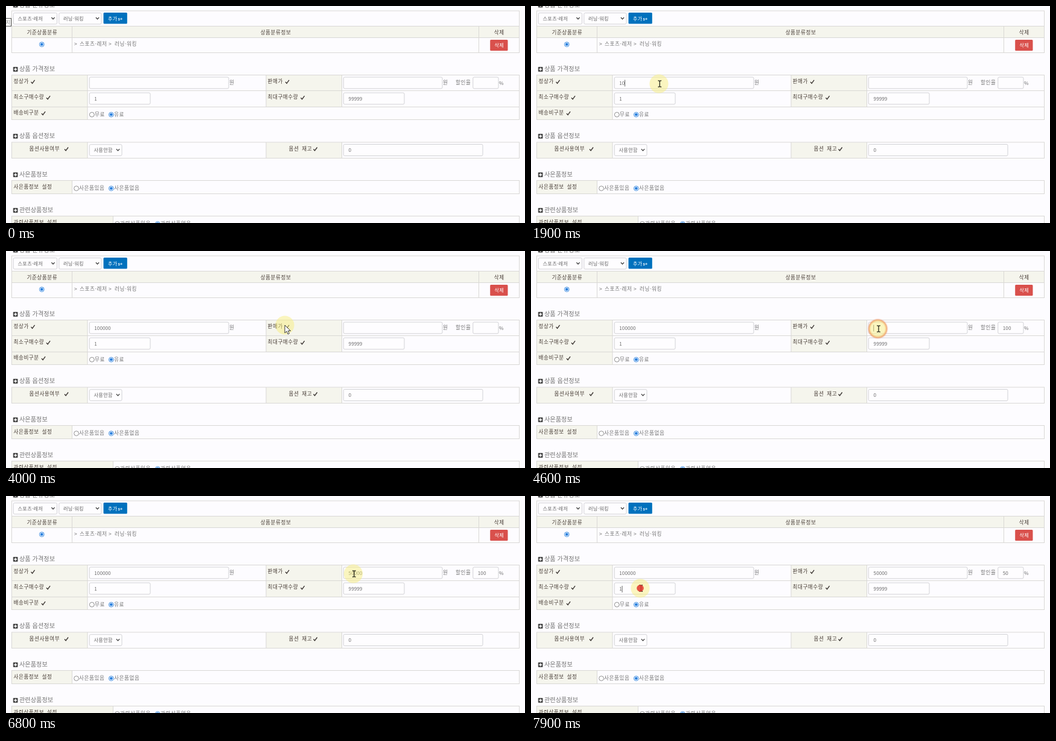
An HTML page for the animation above (8 s loop, 860 px wide and 360 px high).

```html
<!DOCTYPE html>
<html lang="ko">
<head>
<meta charset="utf-8">
<title>상품 등록</title>
<style>
html, body { margin: 0; width: 100%; height: 100%; overflow: hidden; background: #fdfcff; }
svg { display: block; }
text { font: 8.6px "Noto Sans CJK KR", "Noto Sans CJK", sans-serif; fill: #757575; letter-spacing: .6px; word-spacing: 1px; white-space: pre; }
.label { font-weight: 500; fill: #4a3f39; letter-spacing: .55px; word-spacing: 1.8px; }
.title { font-size: 10.2px; fill: #757575; letter-spacing: 0; word-spacing: 0; }
.pick { font-size: 8.2px; letter-spacing: .3px; fill: #666; }
.num { font-size: 8.2px; letter-spacing: 0; fill: #6c6c6c; }
.button { font-size: 8px; font-weight: 500; fill: #fff; letter-spacing: .4px; }
.mid { text-anchor: middle; }
</style>
</head>
<body>
<svg id="stage" width="860" height="360" viewBox="0 0 860 360">
<defs>
<radialGradient id="glow">
<stop offset=".64" stop-color="#f6b868" stop-opacity="0"/>
<stop offset=".78" stop-color="#f2a860" stop-opacity=".55"/>
<stop offset=".84" stop-color="#e88a60" stop-opacity=".7"/>
<stop offset="1" stop-color="#f4b8a8" stop-opacity="0"/>
</radialGradient>
</defs>
<g id="page"></g>
<g id="tip"><rect x="-12" y="20.5" width="20.5" height="13" fill="#fff" stroke="#555"/><text x="-.5" y="30" style="font-size:8px">지</text></g>
<g id="fields"></g>
<rect id="caret" width="1" height="11" fill="#666"/>
<g id="pointer">
<circle r="15.6" fill="#f8ee80" opacity=".5"/>
<path id="beam" d="M-1.5 -5Q.7 -5.2 1.3 -4.2Q1.9 -5.2 4.1 -5M1.3 -4.2V4.6M-1.5 5.2Q.7 5.4 1.3 4.4Q1.9 5.4 4.1 5.2" fill="none" stroke="#26261a" stroke-width="1.3"/>
<path id="arrow" d="M0 0V13L3 10.2L5.2 15L7.4 14L5.3 9.4H9.5Z" fill="#fff" stroke="#222" stroke-width=".9"/>
<circle id="dot" r="5.8" fill="#e0352c" opacity=".85"/>
<circle id="ring" r="17.5" fill="url(#glow)"/>
</g>
</svg>
<script>
const $ = id => document.getElementById(id);
const LINE = '#d9d8d5';

const rect = (x, y, w, h, fill, extra = '') =>
  `<rect x="${x}" y="${y}" width="${w}" height="${h}" fill="${fill}" ${extra}/>`;
const text = (x, mid, s, cls = '', size = 8.6) =>
  `<text x="${x}" y="${mid + size * .37}" class="${cls}">${s}</text>`;
const num = (x, mid, s) => text(x, mid, s, 'num', 8.2);
const shade = (x, y, w, h) => rect(x, y, w, h, '#f5f5ed');
const path = (d, color, width) =>
  `<path d="${d}" fill="none" stroke="${color}" stroke-width="${width}"/>`;
const hline = (y, x = 9, end = 851) => path(`M${x} ${y}H${end}`, LINE, 1);
const vline = (x, y, end) => path(`M${x} ${y}V${end}`, LINE, 1);
const box = (x, y, w, h = 19) => rect(x + .3, y + .5, w - .3, h, '#fefdff', 'rx="2" stroke="#d2d2d5"');
const check = (x, y) => path(`M${x - 3} ${y + .6}l2.1 2.4l4 -5.4`, '#3a3431', 1.4);
const label = (x, y, s, checkX) => text(x, y, s, 'label') + (checkX ? check(checkX, y + .3) : '');

function select(x, y, w, s) {
  const cx = x + w - 6.5, cy = y + 9;
  return box(x, y, w, 18.5) + text(x + 7.5, y + 10, s, 'pick', 8.2) +
    path(`M${cx - 2.6} ${cy - 1}l2.6 2.8l2.6 -2.8`, '#444', 1.3);
}

function radio(x, y, on) {
  const ring = on ? '#2a80de' : '#828282';
  return `<circle cx="${x}" cy="${y}" r="3.9" fill="#fff" stroke="${ring}" stroke-width=".9"/>` +
    (on ? `<circle cx="${x}" cy="${y}" r="2.4" fill="${ring}"/>` : '');
}

function title(y, s) {
  return rect(11.8, y - 3.4, 7.8, 7.8, '#4a4a4a', 'rx="1.2"') +
    path(`M13.3 ${y + .5}h4.8M15.7 ${y - 1.9}v4.8`, '#fff', 1.4) +
    text(22, y, s, 'title', 10.2);
}

const frame = (top, bottom) =>
  hline(top) + hline(bottom) + vline(9.5, top, bottom) + vline(850.5, top, bottom);

$('page').innerHTML = [
  // Category
  title(-2, '상품 분류정보'),
  shade(10, 34, 840, 18), frame(8, 77.5), hline(33.5), hline(52.5),
  vline(109.5, 33.5, 77.5), vline(783.5, 33.5, 77.5),
  select(12, 11, 72.5, '스포츠·레저'), select(87.5, 11, 70.5, '러닝·워킹'),
  rect(161.5, 11, 39.3, 18.6, '#0071bd', 'rx="1.5"'),
  text(169, 20.7, '추가', 'button', 8),
  '<text x="185.5" y="23.5" class="button" style="font-size:7px;font-weight:700;letter-spacing:0">s+</text>',
  text(59.8, 43.5, '기준상품분류', 'label mid'), text(447, 43.5, '상품분류정보', 'label mid'),
  text(817.3, 43.5, '삭제', 'label mid'),
  radio(59.3, 63.7, true),
  text(113, 62.7, '&gt;'), text(122, 62.7, '스포츠·레저'),
  text(170, 62.7, '&gt;'), text(180, 62.7, '러닝·워킹'),
  rect(802.2, 56, 29.3, 18.2, '#d9504c', 'rx="1.5"'), text(817.2, 65.5, '삭제', 'button mid', 8),

  // Price
  title(104.5, '상품 가격정보'),
  shade(10, 115, 125, 73), shade(431, 115, 125, 52),
  frame(114.5, 188.5), hline(140.5), hline(167.5),
  vline(135, 114.5, 188.5), vline(431, 114.5, 167.5), vline(556.5, 114.5, 167.5),
  label(12.5, 125, '정상가', 44.5), label(12.5, 151.3, '최소구매수량', 70),
  label(12.5, 177.3, '배송비구분', 62), label(433.5, 125, '판매가', 466), label(433.5, 151.3, '최대구매수량', 491.5),
  box(138, 117.5, 231), box(138, 143.5, 101), box(559, 117.5, 164), box(559, 143.5, 101), box(773.5, 117.5, 42.5),
  text(370, 127.3, '원'), text(724, 127.3, '원'), text(745, 127.3, '할인율'),
  num(817, 127.5, '%'), num(146.3, 154.4, '1'), num(567.6, 154.4, '99999'),
  radio(142.3, 180.2), text(147, 179.7, '무료'), radio(174.3, 180.2, true), text(179, 179.7, '유료'),

  // Options
  title(215.5, '상품 옵션정보'),
  shade(10, 226.5, 125, 26), shade(431, 226.5, 125, 26), frame(226, 252.5),
  vline(135, 226, 252.5), vline(431, 226, 252.5), vline(556.5, 226, 252.5),
  label(38.5, 236.6, '옵션사용여부', 100), label(468.5, 236.6, '옵션 재고', 512.5),
  select(138, 229.3, 54, '사용안함'), box(559, 229, 231), num(567.6, 239.3, '0'),

  // Gift
  title(279.5, '사은품정보'),
  shade(10, 290, 99, 21), frame(289.5, 311.5), vline(109.5, 289.5, 311.5),
  label(12.5, 299.6, '사은품정보 설정'),
  radio(116.6, 302.6), text(121, 301.8, '사은품있음'), radio(174.3, 302.6, true), text(179, 301.8, '사은품없음'),

  // Related
  title(338.5, '관련상품정보'),
  shade(10, 349, 167, 20), frame(348.5, 372), vline(177.5, 348.5, 372),
  label(12.5, 358.6, '관련상품정보 설정'),
  radio(184.3, 361.5), text(189, 360.7, '관련상품있음'), radio(251.3, 361.5, true), text(256, 360.7, '관련상품없음')
].join('');

$('fields').innerHTML = ['price', 'sale', 'rate']
  .map((id, i) => `<text id="${id}" class="num" x="${[146.3, 567.6, 781.8][i]}" y="131"></text>`).join('');

const LOOP = 8000, STEP = 100, DIGIT = 4.55;
const typing = {
  price: { value: '100000', keys: [1600, 1900, 2200, 2400, 2700, 3000] },
  sale: { value: '50000', keys: [5100, 5400, 5700, 6000, 6300] }
};
const focus = [
  { from: 1000, x: 146.3, y: 122.5, field: 'price' },
  { from: 4500, x: 567.6, y: 122.5, field: 'sale' },
  { from: 7900, x: 146.3 + DIGIT, y: 149 }
];
// Pointer waypoints: time, x, y
const route = [
  [200, -8, 58], [300, 14, 66], [500, 92, 98], [700, 180, 126], [900, 211, 130], [1000, 212, 129],
  [3400, 212, 129], [3500, 223, 125.5], [3600, 247.5, 122.5], [3800, 340, 121.5], [4000, 462, 123],
  [4200, 555, 127], [4400, 573.5, 129], [4600, 574.7, 129], [5000, 575.5, 129],
  [6900, 575.5, 129], [7000, 564, 126], [7100, 524, 125], [7300, 421, 132],
  [7500, 290, 144], [7700, 190, 152], [7800, 181, 153], [8000, 181, 153]
];
const inputs = [[138, 118, 370, 138], [138, 144, 240, 164], [559, 118, 724, 138]];

const show = (id, on) => $(id).setAttribute('visibility', on ? 'inherit' : 'hidden');
const typed = (name, t) => typing[name].keys.filter(k => k <= t).length;
const focused = t => focus.filter(p => p.from <= t).pop();

function position(t) {
  const i = Math.max(1, route.findIndex(p => p[0] > t));
  const a = route[i - 1], b = route[i], u = (t - a[0]) / (b[0] - a[0]);
  return [a[1] + (b[1] - a[1]) * u, a[2] + (b[2] - a[2]) * u];
}

function drawCaret(t) {
  const f = focused(t);
  if (!f) return show('caret', false);
  const n = f.field ? typed(f.field, t) : 0;
  const since = n ? typing[f.field].keys[n - 1] : f.from;
  $('caret').setAttribute('x', f.x + n * DIGIT - .3);
  $('caret').setAttribute('y', f.y);
  show('caret', (t - since + 40) % 1060 < 530);
}

function drawPointer(t) {
  show('pointer', t >= 200);
  if (t < 200) return;
  const [x, y] = position(t);
  const overInput = inputs.some(([l, top, r, b]) => x >= l && x <= r && y >= top && y <= b);
  $('pointer').setAttribute('transform', `translate(${x} ${y})`);
  show('beam', overInput);
  show('arrow', !overInput);
}

function drawClick(t) {
  const f = focused(t);
  const age = f ? t - f.from : LOOP;
  show('dot', age < 100);
  show('ring', age >= 100 && age < 200);
}

function draw(time) {
  const t = Math.floor(time % LOOP / STEP) * STEP;
  show('tip', t < 200);
  for (const name in typing) $(name).textContent = typing[name].value.slice(0, typed(name, t));
  $('rate').textContent = t < 4500 ? '' : t < 7900 ? '100' : '50';
  drawCaret(t);
  drawPointer(t);
  drawClick(t);
}

let start;
function tick(now) {
  start ??= now;
  draw(now - start);
  requestAnimationFrame(tick);
}
draw(0);
requestAnimationFrame(tick);
</script>
</body>
</html>
```
